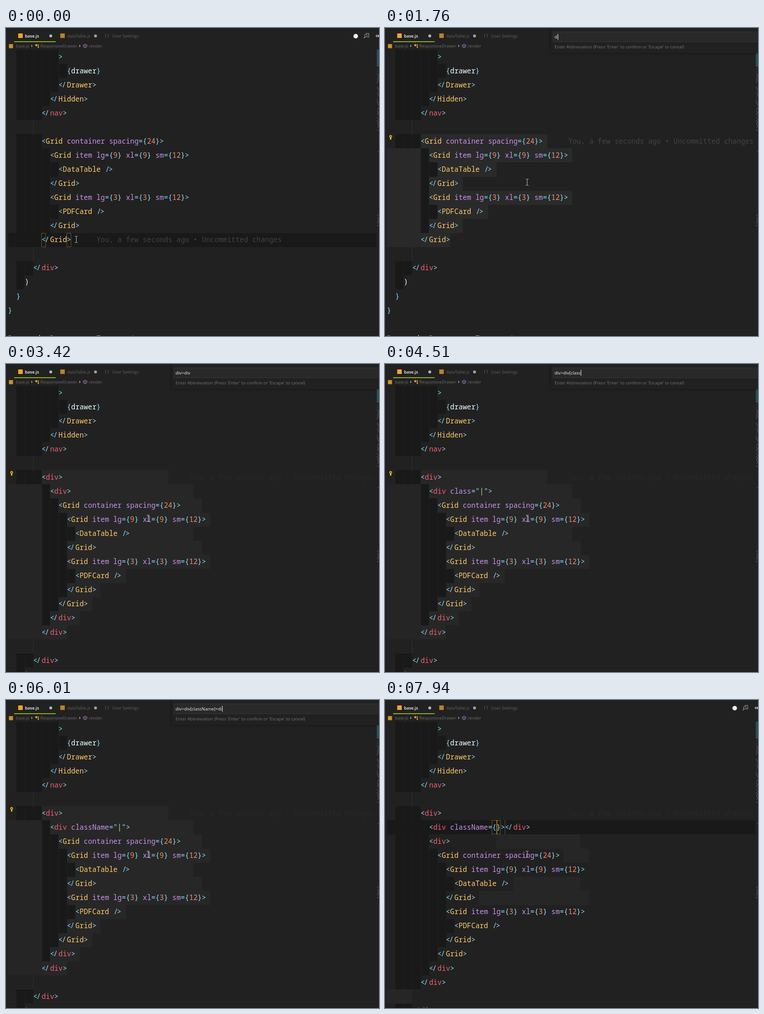
Recreate the animation shown at these times as an HTML page with a canvas. Size 825 by 679 pixels, loop 7.99 s.

```html
<!DOCTYPE html>
<html lang="en">
<head>
<meta charset="utf-8">
<title>Wrap with abbreviation</title>
<style>
html, body { margin: 0; width: 100%; height: 100%; overflow: hidden; background: #212121; }
canvas { display: block; width: 100vw; height: 100vh; }
</style>
</head>
<body>
<canvas id="stage" width="825" height="679"></canvas>
<script>
const ctx = document.getElementById('stage').getContext('2d');
const LOOP = 7990, CELL = 9.324, ROW = 31.06, LEFT = 4.2, TOP = 48;
const MONO = '500 15.54px "Noto Sans Mono", "DejaVu Sans Mono", monospace';
const UI = 'px "Open Sans", "Noto Sans", sans-serif';
const BG = '#212121', DARK = '#191919';
const CYAN = '#89ddff', YELLOW = '#ffcb6b', RED = '#f0606c', PURPLE = '#c792ea',
      ORANGE = '#f78c6c', GREEN = '#c3e88d', WHITE = '#eeffff', ICON = '#f5a52d';

const OPEN = 980, ENTER = 6800, LAG = 150, FIRST = 6, INDENT = 8;
const BLAME = 'You, a few seconds ago • Uncommitted changes';
const KEY_TIMES = [1690, 1880, 2060, 2500, 2640, 2780, 2920, 3630, 3800, 3920, 4030, 4140, 4250,
                   4610, 4700, 4790, 4880, 4970, 5700, 5870, 6000, 6080];
const ABBR = 'div>div[className]+div';
const MOUSE = [[0, 156, 466], [60, 150, 466], [490, 83, 237], [580, 83, 237], [920, 315, 340]];

const pad = (n, lines) => lines.map(s => s && ' '.repeat(n) + s);
const HEAD = ['            >', '              {drawer}', '            </Drawer>',
              '          </Hidden>', '        </nav>', ''];
const GRID = ['<Grid container spacing={24}>', '  <Grid item lg={9} xl={9} sm={12}>',
              '    <DataTable />', '  </Grid>', '  <Grid item lg={3} xl={3} sm={12}>',
              '    <PDFCard />', '  </Grid>', '</Grid>'];
const TAIL = ['', '      </div>', '    )', '  }', '}', '', 'ResponsiveDrawer.propTypes = {'];

const X = col => LEFT + col * CELL;
const Y = row => TOP + row * ROW;
const indentOf = s => s.search(/\S|$/);

function rect(x, y, w, h, color) {
  ctx.fillStyle = color;
  ctx.fillRect(x, y, w, h);
}
function span(row, x1, x2, color) {
  const y = Math.round(Y(row));
  rect(Math.round(x1), y, Math.round(x2) - Math.round(x1), Math.round(Y(row + 1)) - y, color);
}
function text(s, x, y, font, color) {
  ctx.font = font;
  ctx.fillStyle = color;
  ctx.fillText(s, x, y);
}
function dot(x, y, r, color) {
  ctx.fillStyle = color;
  ctx.beginPath();
  ctx.arc(x, y, r, 0, 7);
  ctx.fill();
}
function line(points, color, width = 1, close = false) {
  ctx.strokeStyle = color;
  ctx.lineWidth = width;
  ctx.beginPath();
  points.forEach(([x, y]) => ctx.lineTo(x, y));
  if (close) ctx.closePath();
  ctx.stroke();
}

// The abbreviation's effect on the selected block
function parse(abbr) {
  const m = /^div(>div)?(?:\[(\w*)\]?)?(\+div)?$/.exec(abbr);
  return m && { inner: !!m[1], attr: m[2] ? ` ${m[2]}="|"` : '', plus: !!m[3] };
}
function wrap(p) {
  if (!p) return pad(INDENT, GRID);
  if (!p.inner) return pad(INDENT, ['<div>', ...pad(2, GRID), '</div>']);
  const start = p.plus ? [`<div${p.attr}></div>`, '<div>'] : [`<div${p.attr}>`];
  return pad(INDENT, ['<div>', ...pad(2, [...start, ...pad(2, GRID), '</div>']), '</div>']);
}
function previewAt(t) {
  for (let n = KEY_TIMES.filter(k => k + LAG <= t).length; n > 0; n--) {
    const p = parse(ABBR.slice(0, n));
    if (p) return p;
  }
  return null;
}
function mouseAt(t) {
  let i = 0;
  while (i < MOUSE.length - 1 && MOUSE[i + 1][0] <= t) i++;
  const [t0, x0, y0] = MOUSE[i], [t1, x1, y1] = MOUSE[i + 1] || [t0 + 1, x0, y0];
  let u = Math.min(1, (t - t0) / (t1 - t0));
  u *= u * (3 - 2 * u);
  return [x0 + (x1 - x0) * u, y0 + (y1 - y0) * u];
}

function code(s, row) {
  const tag = s.includes('<'), y = Y(row) + 20.5;
  let prev = '';
  for (const m of s.matchAll(/<\/|\/>|\w+|\S/g)) {
    const w = m[0], x = X(m.index);
    let color = CYAN;
    if (/\w/.test(w)) {
      if (prev[0] === '<') color = /[A-Z]/.test(w) ? YELLOW : RED;
      else if (/\d/.test(w)) color = ORANGE;
      else color = tag ? PURPLE : WHITE;
    } else if (w === ')' || w === '.') color = WHITE;
    else if (w === '|') color = GREEN;
    if (w === '</') {
      text('<', x, y, MONO, color);
      text('/', x + CELL - 2, y, MONO, color);
    } else if (w === '/>') {
      text('/', x + 1, y, MONO, color);
      text('>', x + CELL - 1, y, MONO, color);
    } else text(w, x, y, MONO, color);
    prev = w;
  }
}

function indentBands(s, row) {
  const n = indentOf(s);
  if (n <= 2) return;
  span(row, X(2), X(n), DARK);
  for (let c = 4; c < n; c += 2) span(row, X(c), X(c) + 1, '#202020');
}

// Right edge of a selected row, counting the line break
const edge = (block, i) =>
  i < block.length ? X(block[i].length + (i < block.length - 1 ? 1 : 0)) : 0;
const EARLIER = [wrap(null), wrap({ inner: false }), wrap({ inner: true, attr: '' })];

function selection(t, block, preview, mouse) {
  const active = t < OPEN;
  let head = FIRST, col = INDENT;
  if (t < 490) {
    head = Math.max(FIRST, Math.min(13, Math.floor((mouse[1] - TOP) / ROW)));
    const len = block[head - FIRST].length;
    col = Math.max(0, Math.min(len, Math.round((mouse[0] - LEFT) / CELL)));
  }
  const fill = active ? '#343434' : preview ? '#272727' : '#2a2a2a';
  const side = active ? '#2c2c2c' : preview ? '#252525' : '#292929';
  block.forEach((s, i) => {
    const row = FIRST + i;
    if (row < head) return;
    let right = edge(block, i);
    if (preview) {
      const seen = preview.inner ? EARLIER : EARLIER.slice(0, 2);
      right = Math.max(right, ...seen.map(b => edge(b, i)));
    }
    if (row === head) span(row, X(col), right, fill);
    else {
      span(row, X(0), X(2), active ? fill : side);
      span(row, X(2), X(INDENT), side);
      span(row, X(indentOf(s)), right, fill);
    }
  });
  if (active) span(head, X(col), X(col) + 1.5, '#ffcc00');
}

function bracketBox(row, col, n = 1) {
  ctx.strokeStyle = '#6f5b1c';
  ctx.lineWidth = 1;
  ctx.strokeRect(Math.round(X(col)) - .5, Math.round(Y(row)) + .5, n * CELL, ROW - 1);
}

function editor(t) {
  const mouse = mouseAt(t), done = t >= ENTER, preview = previewAt(t);
  let block = wrap(preview);
  if (done) {
    const value = t < 7830 ? '=""' : t < 7940 ? '=' : '={}';
    block = wrap({ inner: true, plus: true, attr: ' className' + value });
  }
  const rows = [...HEAD, ...block, ...TAIL].slice(0, 21);

  rows.forEach(indentBands);
  rows.forEach((s, i) => { if (!s && i < 19) span(i, X(6), X(6) + 1, '#303030'); });

  if (t < 60) {
    span(13, 5, 819, DARK);
    bracketBox(13, 8);
    bracketBox(13, 14);
    text(BLAME, X(21), Y(13) + 20.5, MONO, '#424242');
  } else if (!done) selection(t, block, preview, mouse);
  else {
    [[8, 246, 432], [9, 395, 451], [11, 283, 432], [12, 208, 451], [19, 4, 60]]
      .forEach(([r, a, b]) => span(r, a, b, '#262626'));
    span(7, 5, 819, DARK);
    const caret = t >= 7830 && t < 7940 ? 25 : 26;
    const stop = caret === 25 ? 26 : 28;
    span(7, X(stop), X(stop) + 1, '#555555');
    if (t >= 7940) bracketBox(7, 25, 2);
    if (t >= 7830 || (t - ENTER) % 1000 < 500) span(7, X(caret), X(caret) + 1.5, '#ffcc00');
  }
  if (t >= 900) text(BLAME, X(43), Y(FIRST) + 20.5, MONO, preview ? '#292929' : '#424242');

  rows.forEach(code);

  if (t >= 860 && !done) {
    dot(12.5, 239, 3, '#e8bf1c');
    dot(12.5, 239, 1.2, BG);
    rect(11, 242, 3, 4, '#e8bf1c');
  }
  return mouse;
}

function minimap() {
  for (let y = 48; y < 86; y += 2) rect(820, y, 5, 1, '#367c8e');
  const noise = n => { const v = Math.sin(n * 127.1) * 43758.5; return v - Math.floor(v); };
  for (const [a, b] of [[90, 228], [270, 276], [408, 437]]) {
    for (let y = a; y < b; y += 2) {
      const v = noise(y);
      if (v > .3) rect(820 + 4 * noise(y + 1), y, 1.5, 1, v > .85 ? '#8b6aa0' : '#878787');
    }
  }
}

function header() {
  const gray = '#626262', crumb = '#6a6a6a';
  rect(0, 0, 825, 48, BG);
  rect(27, 12, 10, 10, ICON);
  text('base.js', 42, 21, '600 9.4' + UI, '#ffffff');
  dot(99, 17.5, 3.2, '#b5b5b5');
  rect(18, 29.5, 92, 1.5, '#aeea00');
  rect(120, 12, 10, 10, '#b8802c');
  text('dataTable.js', 135, 21, '9.4' + UI, gray);
  dot(198, 17.5, 3.2, '#a0a0a0');
  text('{ }', 218.5, 20, '9' + UI, '#7b6067');
  text('User Settings', 235, 21, '9.55' + UI, gray);

  rect(6.5, 35.5, 9, 9, '#d18f2c');
  text('base.js', 22, 43, '9.2' + UI, crumb);
  for (const x of [56, 162]) {
    ctx.fillStyle = '#999999';
    ctx.beginPath();
    ctx.moveTo(x, 36.5); ctx.lineTo(x + 3, 39.5); ctx.lineTo(x, 42.5);
    ctx.fill();
  }
  dot(67, 38, 2.4, '#e09a45');
  dot(71.5, 37.5, 1.6, '#e09a45');
  dot(71.5, 42, 1.8, '#e09a45');
  text('ResponsiveDrawer', 76, 43, '9.4' + UI, crumb);
  line([[175, 35.5], [179, 37.5], [179, 41.5], [175, 43.5], [171, 41.5], [171, 37.5]], '#a878c8', 1, true);
  line([[171, 37.5], [175, 39.5], [179, 37.5]], '#a878c8');
  line([[175, 39.5], [175, 43.5]], '#a878c8');
  text('render', 183, 43, '9.4' + UI, crumb);
}

function actions() {
  const c = '#a8a8a8';
  dot(773.5, 18, 5, '#f2f2f2');
  line([[796, 13], [796, 12], [802.5, 12], [802.5, 20], [799, 20]], c);
  ctx.beginPath();
  ctx.arc(796, 17, 3, 0, 7);
  ctx.stroke();
  line([[794, 19.5], [791.5, 22.5]], c, 1.4);
  line([[821, 14.5], [818, 17.5], [821, 20.5]], c, 1.2);
  line([[818, 17.5], [825, 17.5]], c, 1.2);
  dot(824, 17.5, 2.5, c);
}

function palette(t) {
  const n = KEY_TIMES.filter(k => k <= t).length;
  const typed = ABBR.slice(0, n), font = '9.8' + UI;
  ctx.save();
  ctx.shadowColor = 'rgba(0,0,0,.45)';
  ctx.shadowBlur = 6;
  rect(367, -6, 470, 61, BG);
  ctx.restore();
  rect(371, 9, 454, 21, '#292929');
  line([[825, 8.5], [371.5, 8.5], [371.5, 30.5], [825, 30.5]], '#343434');
  text(typed, 375, 23.3, '500 ' + font, '#f4f4f4');
  const since = t - (n ? KEY_TIMES[n - 1] : OPEN);
  if (since % 1000 < 500) rect(Math.round(375.5 + ctx.measureText(typed).width), 13, 1, 13, '#ffffff');
  text("Enter Abbreviation (Press 'Enter' to confirm or 'Escape' to cancel)",
       375, 45, '9.57' + UI, '#757575');
}

function pointer([x, y]) {
  x = Math.round(x) - .5;
  y = Math.round(y);
  const c = '#c8c8c8';
  line([[x, y - 6], [x, y + 6]], c);
  for (const s of [-1, 1]) {
    line([[x - 3, y + s * 7], [x - 1, y + s * 7], [x, y + s * 6], [x + 1, y + s * 7], [x + 3, y + s * 7]], c);
  }
}

function draw(now) {
  const t = now % LOOP;
  rect(0, 0, 825, 679, BG);
  const mouse = editor(t);
  minimap();
  header();
  if (t >= OPEN && t < ENTER) palette(t);
  else actions();
  rect(0, 678, 825, 1, 'rgba(0,0,0,.3)');
  pointer(mouse);
}

let began;
function tick(now) {
  began ??= now;
  draw(now - began);
  requestAnimationFrame(tick);
}
draw(0);
requestAnimationFrame(tick);
</script>
</body>
</html>
```
